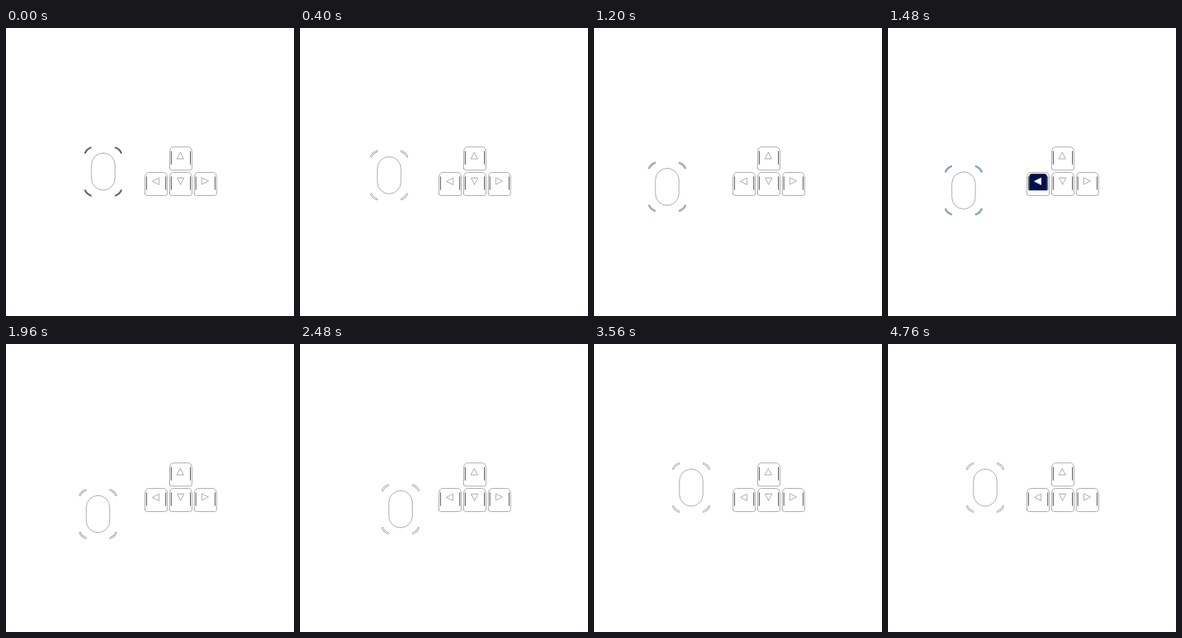
Animation of 360x360 px, one loop 5 s. Source, as an HTML page:

```html
<!DOCTYPE html>
<html lang="en">
<head>
<meta charset="utf-8">
<title>Arrow keys</title>
<style>
html, body { margin: 0; width: 100%; height: 100%; overflow: hidden; background: #fff; }
svg { display: block; width: 100vw; height: 100vh; }
.key { stroke: #999; stroke-width: .8; }
.side { stroke: #555; stroke-width: 1; }
.face { visibility: hidden; stroke: #333; }
.pressed .face { visibility: visible; }
.pressed .arrow { stroke: #333; }
.left.pressed .face { fill: #001050; }
.left.pressed .arrow { fill: #fff; stroke: #fff; }
</style>
</head>
<body>
<svg viewBox="0 0 360 360" fill="none" stroke-linecap="round" stroke-linejoin="round">
  <defs>
    <path id="corner" d="M-22.5-23.5Q-20.5-28-15.5-30"/>
    <g id="corners">
      <use href="#corner"/>
      <use href="#corner" transform="scale(-1 1)"/>
      <use href="#corner" transform="scale(1 -1)"/>
      <use href="#corner" transform="scale(-1 -1)"/>
    </g>
  </defs>
  <g id="keys"></g>
  <g id="pad">
    <rect x="-14.7" y="-23.2" width="29.4" height="46.4" rx="14.7" stroke="#999" stroke-width=".8"/>
    <g id="brackets">
      <use href="#corners" stroke="#888" stroke-width="2.4"/>
      <use href="#corners" id="core" stroke-width="1.2"/>
    </g>
  </g>
</svg>
<script>
const LOOP = 5000, STEP = 40, PRESS = 200;
const $ = id => document.getElementById(id);

// Drag path of the pad: time, x, y
const stops = [
  [0, 121.5, 179.5], [880, 94, 193.7], [1480, 94.5, 203],
  [1960, 115, 212.5], [2480, 125.7, 206.5], [3360, 121.5, 179.5]
];

// Cubic curve through the stops, at rest at both ends
function padAt(t) {
  const i = stops.findIndex(s => s[0] > t) - 1;
  if (i < 0) return stops[0].slice(1);
  const a = stops[i], b = stops[i + 1], d = b[0] - a[0], u = (t - a[0]) / d;
  const slope = (j, k) => {
    const p = stops[j - 1], n = stops[j + 1];
    return p && n ? (n[k] - p[k]) / (n[0] - p[0]) : 0;
  };
  return [1, 2].map(k =>
    a[k] + (b[k] - a[k]) * u * u * (3 - 2 * u) +
    d * u * (1 - u) * (slope(i, k) * (1 - u) - slope(i + 1, k) * u));
}

const bump = (t, center, width) => Math.exp(-(((t - center) / width) ** 2));

// Column and row on the key grid, arrow angle, time of the press
const keys = [
  ["up", 0, 0, 0], ["left", -1, 1, -90, 1480],
  ["down", 0, 1, 180, 880], ["right", 1, 1, 90]
].map(([name, col, row, angle, press]) => {
  const x = 218.5 + col * 30.8, y = 163.2 + row * 31.8;
  $("keys").insertAdjacentHTML("beforeend", `
    <g id="${name}" class="key ${name}" transform="translate(${x} ${y})">
      <path d="M-14 12V-8Q-13.5-14.5-9-14.5H9Q13.5-14.5 14 -8V12Q14 14.5 11 14.5H-11Q-14 14.5-14 12Z"/>
      <path class="side" d="M-12-9V7M12-9V7"/>
      <path class="face" d="M-11 8V-9Q-11-12.5-8-12.5H8Q11-12.5 11-9V8"/>
      <path class="arrow" d="M0-4L4 4H-4Z" transform="translate(-.5 -3.5) rotate(${angle})"/>
    </g>`);
  return { node: $(name), press };
});

function draw(now) {
  const t = Math.floor(now % LOOP / STEP) * STEP;
  $("pad").setAttribute("transform", `translate(${padAt(t)})`);
  const tint = bump(t, 1450, 420), flash = bump(t, 0, 60);
  $("core").setAttribute("stroke", `hsl(195 ${60 * tint}% ${100 - 35 * tint - 65 * flash}%)`);
  $("brackets").setAttribute("opacity", 1 - bump(t, 880, 150));
  for (const { node, press } of keys)
    node.classList.toggle("pressed", Math.abs(t - press) < PRESS);
  requestAnimationFrame(draw);
}
requestAnimationFrame(draw);
</script>
</body>
</html>
```
